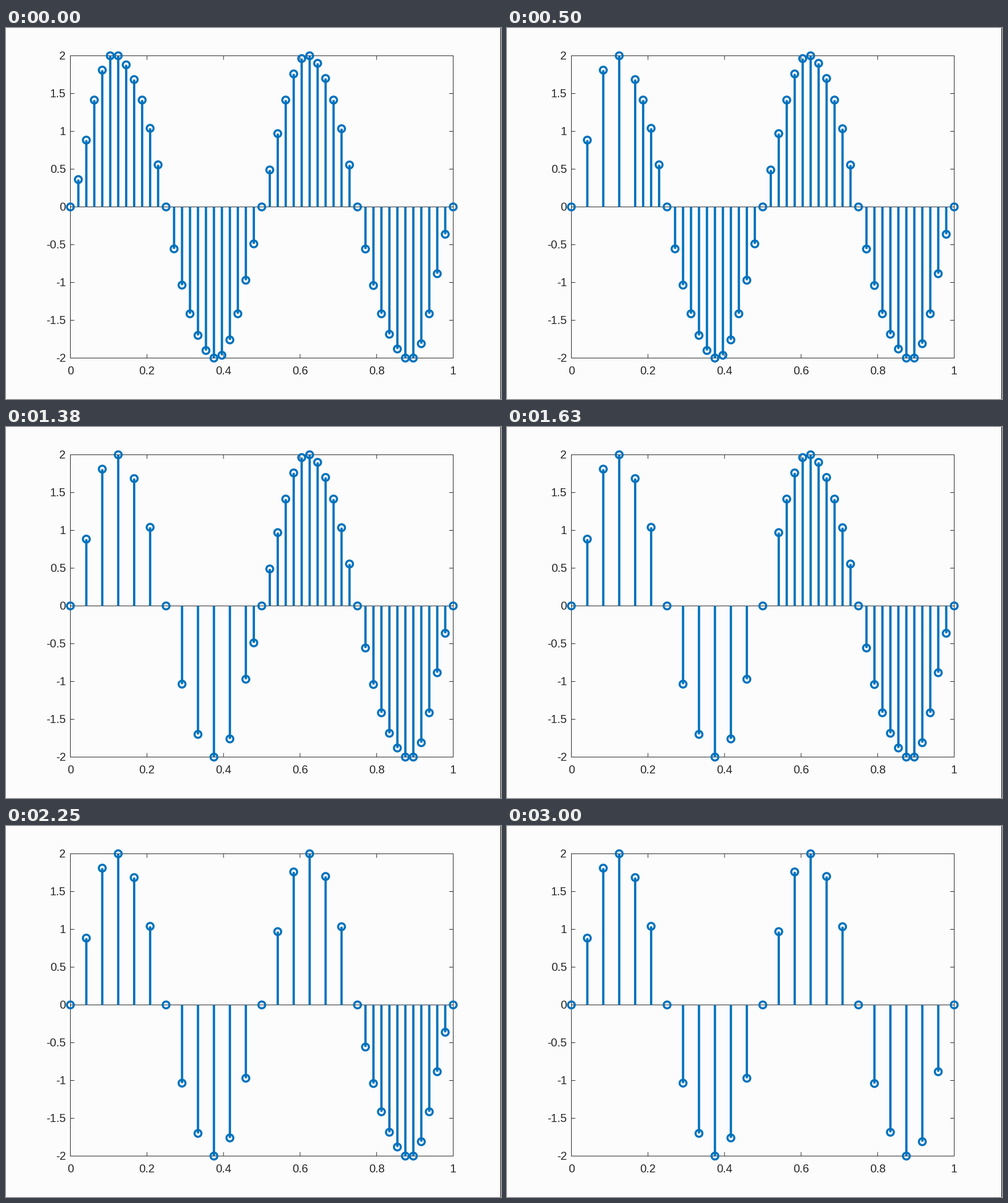
These frames come from a looping animation (865 by 648 pixels, 3.12 s). A matplotlib script:

```python
import numpy as np
import matplotlib.pyplot as plt
from matplotlib.animation import FuncAnimation

W, H, DPI = 865, 648, 100
PX = 72 / DPI  # points per pixel
LOOP, STEPS = 3120, 25
LEFT, RIGHT, TOP, BOTTOM = 112.5, 781.5, 48.5, 576.5
BLUE, INK, PAPER = "#0072bd", "#262626", "#fcfcfd"

# First half of the resampled sine; the second half is its point reflection.
R = 2 ** 0.5
half = np.array([0, 0.362, 0.884, R, 1.81, 2, 2, 1.88, 1.685, R, 1.04, 0.557,
                 0, -0.555, -1.035, -R, -1.70, -1.90, -2, -1.963, -1.76, -R,
                 -0.97, -0.489])
values = np.concatenate([half, [0], -half[::-1]])
# The reflection pairs sample k with sample 48 - k, so skip the repeated zero.
values = np.concatenate([half, [0], -half[:0:-1], [0]])
index = np.arange(len(values))


def to_x(t):
    return LEFT + (RIGHT - LEFT) * t


def to_y(v):
    return (TOP + BOTTOM) / 2 - (BOTTOM - TOP) / 4 * v


fig = plt.figure(figsize=(W / DPI, H / DPI), dpi=DPI, facecolor=PAPER)
ax = fig.add_axes([0, 0, 1, 1])
ax.set_xlim(0, W)
ax.set_ylim(H, 0)
ax.axis("off")


def line(xs, ys, color=INK, width=1, z=1):
    return ax.plot(xs, ys, color=color, lw=width * PX, snap=False,
                   solid_capstyle="butt", zorder=z)[0]


def label(x, y, value, ha):
    ax.text(x, y, f"{value:g}", ha=ha, va="baseline", color=INK,
            family="Liberation Sans", size=20 * PX)


# Frame, baseline, ticks and labels
for y in (TOP, to_y(0), BOTTOM):
    line([LEFT - 0.5, RIGHT + 0.5], [y, y])
for x in (LEFT, RIGHT):
    line([x, x], [TOP, BOTTOM])
for i in range(6):
    x = to_x(i / 5)
    line([x, x], [BOTTOM, BOTTOM - 7])
    line([x, x], [TOP, TOP + 7])
    label(x, 605, i / 5, "center")
for i in range(-4, 5):
    y = to_y(i / 2)
    line([LEFT, LEFT + 7], [y, y])
    line([RIGHT, RIGHT - 7], [y, y])
    label(104.5, y + 6.5, i / 2, "right")
line([W - 0.5, W - 0.5], [0, H], "black")

stems = line([], [], BLUE, 4, 2)
rings = ax.scatter([], [], s=(12 * PX) ** 2, facecolors="none",
                   edgecolors=BLUE, linewidths=3.6 * PX, zorder=3)


def draw(step):
    """Drop one more odd sample, from the left, at every step."""
    keep = (index % 2 == 0) | (index > 2 * step)
    x, y = to_x(index[keep] / index[-1]), to_y(values[keep])
    gap = np.full_like(x, np.nan)
    base = np.full_like(x, to_y(0))
    stems.set_data(np.column_stack([x, x, gap]).ravel(),
                   np.column_stack([base, y, gap]).ravel())
    rings.set_offsets(np.column_stack([x, y]))
    return stems, rings


anim = FuncAnimation(fig, draw, frames=STEPS, interval=LOOP / STEPS,
                     repeat=True, repeat_delay=0)
plt.show()
```
